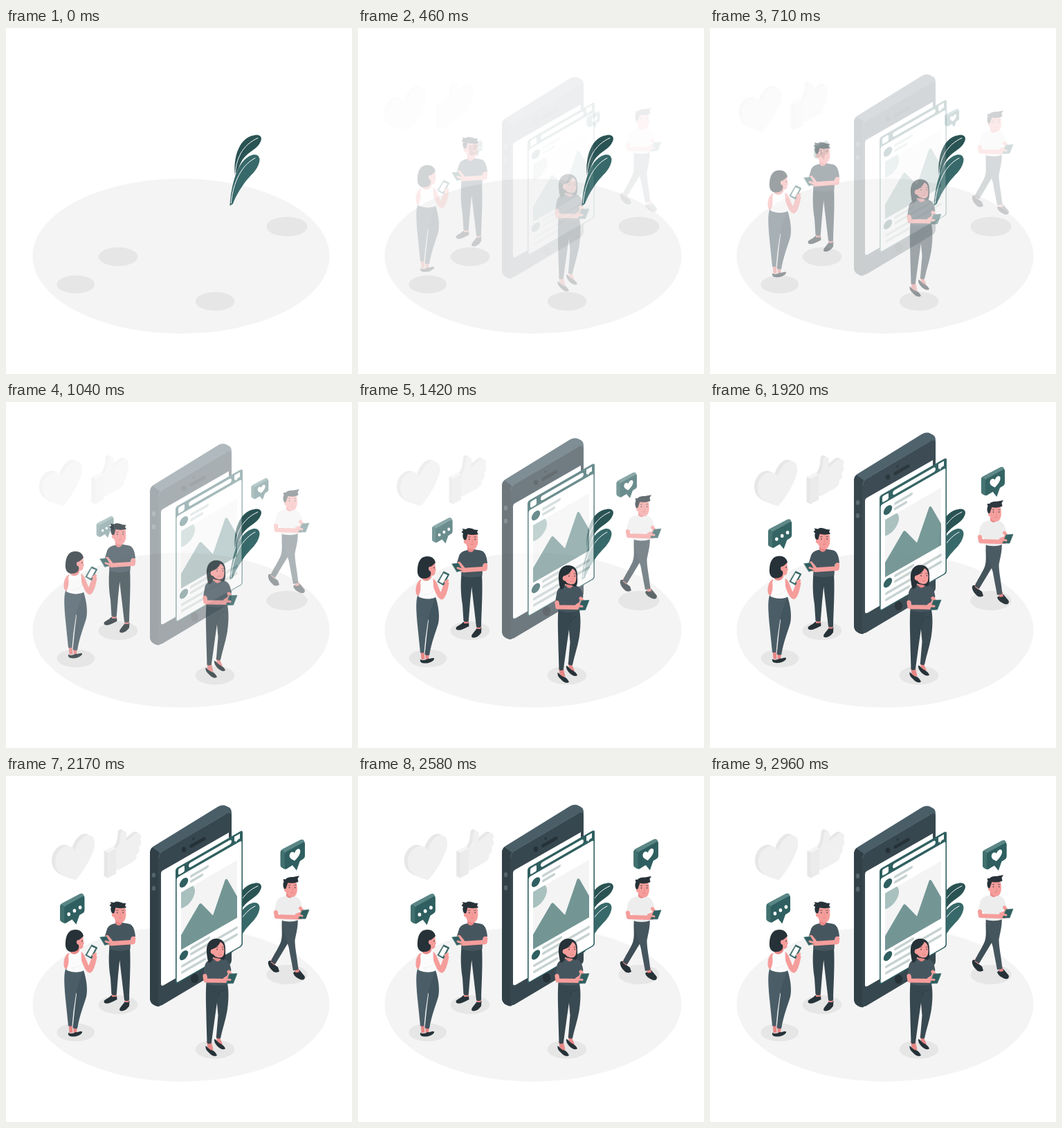
These frames come from a looping animation (500 px wide and 500 px high, 3000 ms). An HTML page with a canvas:

```html
<!DOCTYPE html>
<html lang="en">
<head>
<meta charset="utf-8">
<title>Social feed</title>
<style>
html, body { margin: 0; width: 100%; height: 100%; overflow: hidden; background: #fff; }
canvas { display: block; width: 500px; height: 500px; }
</style>
</head>
<body>
<canvas id="stage"></canvas>
<script>
const SIZE = 500, LOOP = 3000, ISO = -0.575;
const SLOW = 2958, QUICK = SLOW * 2 / 3;
const ratio = window.devicePixelRatio || 1;
const stage = document.getElementById('stage');
const sheet = document.createElement('canvas');
for (const c of [stage, sheet]) c.width = c.height = Math.round(SIZE * ratio);
const out = stage.getContext('2d');
const pen = sheet.getContext('2d');

const teal = '#2f5f60', tealMid = '#41706f', tealSoft = '#c6d2d1';
const ink = '#263238', slate = '#37474f', steel = '#455a64';
const skin = '#f59d9b', skinDark = '#e88887', white = '#fff';

// drawing helpers, all on the current sheet
function fill(d, color) {
  pen.fillStyle = color;
  pen.fill(new Path2D(d));
}
function line(d, color, width) {
  pen.strokeStyle = color;
  pen.lineWidth = width;
  pen.lineCap = pen.lineJoin = 'round';
  pen.stroke(new Path2D(d));
}
function oval(x, y, rx, ry, color) {
  pen.fillStyle = color;
  pen.beginPath();
  pen.ellipse(x, y, rx, ry, 0, 0, Math.PI * 2);
  pen.fill();
}
function box(x, y, w, h, r, color) {
  pen.fillStyle = color;
  pen.beginPath();
  pen.roundRect(x, y, w, h, r);
  pen.fill();
}
function at(x, y, slope, draw) {
  pen.save();
  pen.transform(1, slope, 0, 1, x, y);
  draw();
  pen.restore();
}

// timing curve: cubic-bezier(.36, -.01, .5, 1.38)
function bez(u, a, b) {
  const v = 1 - u;
  return 3 * v * v * u * a + 3 * v * u * u * b + u * u * u;
}
function ease(x) {
  if (x >= 1) return 1;
  let lo = 0, hi = 1;
  for (let i = 0; i < 30; i++) {
    const mid = (lo + hi) / 2;
    if (bez(mid, 0.36, 0.5) < x) lo = mid; else hi = mid;
  }
  return bez(lo, -0.01, 1.38);
}

function layer(draw, alpha = 1, dx = 0, dy = 0, scale = 1, ox = 0, oy = 0) {
  if (alpha <= 0) return;
  pen.setTransform(1, 0, 0, 1, 0, 0);
  pen.clearRect(0, 0, sheet.width, sheet.height);
  pen.scale(ratio, ratio);
  pen.translate(dx + ox, dy + oy);
  pen.scale(scale, scale);
  pen.translate(-ox, -oy);
  draw();
  out.globalAlpha = Math.min(1, alpha);
  out.drawImage(sheet, 0, 0);
}

function ground() {
  oval(253, 329.7, 214.5, 112, '#f4f4f4');
  const shade = '#e6e6e6';
  oval(162, 330.5, 28.3, 13.5, shade);
  oval(100.8, 370.5, 27.3, 13, shade);
  oval(302, 395, 28.3, 13.5, shade);
  oval(406, 287, 29.7, 14, shade);
  fill('M331 213C328 187 337 158 359 155C367 153 371 158 368 164C364 175 350 178 342 190C337 198 335 206 331 213Z', '#2a5354');
  line('M331.5 211C332 190 341 169 364 159', white, 1);
  fill('M323.5 257C325 231 333 190 356 183.5C364 181.5 368 187 366 194C363 206 353 213 346 222C338 233 331 245 328 254Z', '#38696a');
  line('M325.3 253C327 232 336 200 360 188', white, 1);
}

function icons() {
  const side = '#e7e7e7', front = '#f0f0f0';
  const heart = 'M99.5 150.5C90 147 71 144 70 126C69 110 82 99 91 102C96 103 98 106 99 107C101 98 109 86 117 85.5C127 85 129 96 126 105C121 122 107 143 99.5 150.5Z';
  at(-5, -2, 0, () => fill(heart, side));
  fill(heart, front);

  const hand = 'M157 106C163 100 164 92 164.5 84C165 77 172 78 173 84C173.5 89 172 92 171.5 95L185 84C194 79 196 88 192.5 92C196 95 194 101 191 103C193 107 191 112 187 114C189 118 186 122 181 125L161 136L157 135Z';
  at(-4, -2, 0, () => fill(hand, side));
  fill(hand, front);
  fill('M140.5 108L153 102L158 104.5V141L146 147.5L140.5 144.5Z', '#f5f5f5');
  fill('M140.5 108L146 111V147.5L140.5 144.5Z', side);
  fill('M146 111L158 104.5V141L146 147.5Z', '#ebebeb');
}

function card() {
  box(0, 0, 97, 167.5, 3.5, teal);
  box(1.6, 14.5, 93.8, 151.4, 2.5, white);
  box(4, 3, 9, 9, 2, white);
  box(19, 4, 62, 6.6, 3.3, white);
  fill('M85 3H93V10H90L87 12.5V10H85Z', white);

  oval(12, 27.3, 6.2, 6.2, teal);
  line('M23 24H46M23 31.5H38', tealSoft, 4);

  box(8, 39.2, 81, 83, 0, '#f4f4f4');
  pen.save();
  pen.beginPath();
  pen.rect(8, 39.2, 81, 83);
  pen.clip();
  oval(13, 48.2, 15, 15, '#a8c0be');
  pen.restore();

  oval(12, 132.3, 6.2, 6.2, teal);
  line('M23 128.3H48M23 136.5H88M10 146.5H88M10 155.5H42', tealSoft, 4);
}

function phone() {
  fill('M208 113Q208 106 213 103L306 45.6Q313 41.5 319 44.8L323 47Q326 49 326 55V120L220 334L213.5 332Q208 329 208 322Z', '#4a5e68');
  fill('M208 113Q208 108 211.5 104.5L222 112V334Q218 335 213.5 332Q208 329 208 322Z', '#314047');
  fill('M220 121Q220 113.5 226 110L317 56.5Q326 51.5 326 59.5V267Q326 272.5 321 275.5L227 331.5Q220 336 220 328Z', slate);
  line('M220.5 119Q221 113 226 110L317 56.5', '#62737c', 0.6);
  for (const y of [144.4, 163.4]) oval(213.5, y, 2.8, 3.6, '#54636b');
  fill('M224 142Q224 139 226.5 137.6L322 83V249L228 303.5Q224 305.5 224 302Z', white);
  oval(257, 107.5, 3.3, 3.9, ink);
  oval(271, 92, 1.5, 1.8, ink);
  line('M267.5 102.7L286.5 91.7', ink, 4.6);
  oval(272.5, 293.5, 5.6, 6.8, ink);
  at(245, 134.8, ISO, card);
  fill('M253 231.2L279 186.7Q281 183.7 283.5 186.7L299 202.7L316.5 151.7Q318 148.2 320.5 151.7L334 175.2V206L253 252.4Z', '#739695');
}

function bubble(x, y, mark) {
  at(x, y, 0, () => {
    fill('M0 19Q0 15.5 3 14L28 .8Q31 -.5 33 1.5L34.5 5V24L8 42.6Q5 42.5 1.5 40Q0 39 0 37Z', '#5b8686');
    fill('M0 19Q0 17 1 15.6L7 18.5V42.6Q4 42 1.5 40Q0 39 0 37Z', tealMid);
    fill('M6 22Q6 19 8.5 17.5L32 4.5Q34.5 3.5 34.5 6.5V24.5Q34.5 27 32 28.2L27.5 31L22.8 44.2L17 37L9 41.5Q6 43 6 40Z', teal);
    mark();
  });
}
function bubbles() {
  bubble(81.5, 169.2, () => {
    for (let i = 0; i < 3; i++) oval(12.4 + i * 8, 29.6 - i * 4.8, 2.3, 2.7, white);
  });
  bubble(394, 92.5, () =>
    fill('M20 30.5C17 29 12.5 27.5 12.7 23C13 18 18 16.5 20 19.5C21.5 14 27 11.5 28 16C28.8 21 23.5 27 20 30.5Z', white));
}

function face(x, y) {
  for (const dx of [-4.3, 4]) {
    oval(x + dx, y, 0.65, 1, ink);
    line(`M${x + dx - 1.5} ${y - 3.2}l2.8 -.3`, ink, 0.6);
  }
  line(`M${x} ${y}l1.2 4.2l-1.4 .2`, skinDark, 0.7);
  line(`M${x - 1.8} ${y + 7.5}q1.6 .8 3.2 -.2`, '#c9686a', 0.6);
}
function device(d) {
  fill(d, teal);
  line(d, tealMid, 0.7);
}

function manLeft() {
  fill('M142 324.5C145 321.5 149 321 152 317L160 317L160.5 323C154 326 149 329.5 144 328.5C141.5 328 141 326 142 324.5Z', ink);
  fill('M164 337C166 332.5 170.5 329 172 325L178.5 325L178 332.5C174 338 169 341 164.5 339Z', ink);
  fill('M153 313H159.5V319H153ZM171.5 319H177.5V327H171.5Z', skinDark);
  fill('M149.5 247C148 262 148.5 278 151 292L152.5 315.5Q156 318 159.8 316L162 288L164.2 266L167 290L171 324Q175 326 178 324C178.5 300 180.5 272 179 247Z', slate);
  fill('M158 205H168.5V216C165 220 160 219 158 215Z', skinDark);
  fill('M158 213C153 214 147 216 145.5 223L142.5 233L149 236L149.5 250C159 254 172 253 179.5 250L180.5 234L187 232C186 222 184 215 177 213.5L168 212C166 217 161 217.5 158 213Z', '#46565f');
  line('M146 233L151 239', skin, 6);
  line('M184 235L183.5 240L153 242', skin, 6.5);
  fill('M150 238C147 233 143 234 143 238L147 244L154 245.5Z', skin);
  device('M136 233L145 232L151 242L143 244.5Z');
  line('M144 239L150 241', skin, 3);
  fill('M155 189C161 185 172 186 172.8 192C174 201 173.5 209 168 211.5C162 213 157 209 156 204C152 204 152 197 155 197.5Z', skin);
  fill('M153 198C151 195 151 191 152 189L149.5 187L152 184.5L150.5 182L156 183C160 180 165 182 168 183.5L173.5 184L172 187L174 190C169 191.5 162 191.5 158.5 190C157.5 193 157 197 156 198.5Z', ink);
  face(165.2, 197.5);
}

function manRight() {
  fill('M379 267C382 264 384 266 386 270L393 275L395 281C390 284 386 282 384 279C381 276 378 271 379 267Z', ink);
  fill('M415 283C419 281 420 278 424 279L431.5 288C433 292 430 294 426 293C421 291 416 288 415 283Z', ink);
  fill('M384 262L390 266L388 272L382.5 268ZM416 276L422.5 275L424 282L418.5 283Z', skinDark);
  fill('M399 205C397.5 218 400.5 229 397 239C393 249 386 258 382.8 267L388.8 271L407 241L415 213Z', '#3f4f57');
  fill('M399 205C400 222 405 234 408.5 246L415 280L422.5 278.5C421 262 417.5 248 417.5 236C420 224 422.5 214 421.5 205Z', '#46565f');
  fill('M405 166H415V176C412 179 407 178 405 175Z', skinDark);
  fill('M405 172C397 173 391 176 390 184L387.5 194L396 197L397 207C405 210 415 210 422 207L423 193L428 189C427 180 424 174 415 171.5C412 176 408 176 405 172Z', '#ededed');
  line('M390 196L391 202L422 203', skin, 6.2);
  line('M425.5 190L429 195', skin, 5);
  fill('M418 198L428 194L431 199L427 206L418 206Z', skin);
  device('M428 193L438 192L433 205L423 205Z');
  line('M423 200L428 201', skin, 3);
  fill('M404 152C409 147 419 148 420 154C421.5 161 421.5 170 416.5 173C410 175 406 171 405 166.5C401.5 167 401 160.5 404 160Z', skin);
  fill('M402 162C400 158 400 154 401.5 151.5L400.5 148L404 148C408 143.5 413 145.5 416 144.5L424 143L421.5 147L422.5 151.5C417 154 411 154 407.5 153C406 156 405.5 159 404.5 161.5Z', ink);
  face(413.8, 160);
}

function womanLeft() {
  fill('M90.5 359H95.5L96.5 371H91.5ZM97 361H103L102 372L97.5 370Z', skinDark);
  fill('M90 371C93 373 97 372 101 370C104 371 107 368 110 369.5C111 372 105 376 99 376.5C94 377 89 376 90 371Z', ink);
  fill('M92 255C86 257 83 265 83.5 273C84 279 88 281 92 281V266Z', skin);
  fill('M112 281C116 292 118.5 308 116 319C112.5 331 106 347 103.2 364.5Q100 366 96.5 364L99.5 335L102 315L92 290Z', '#43555f');
  fill('M86 279C83 288 84.5 305 86 322L90 361Q92.5 362.5 95.5 361L97.5 340L101 316C102 304 108 294 111 283Z', '#4b5e68');
  fill('M95 247L106 246L106 254C106 259 95 260 93 255Z', skinDark);
  fill('M92 254.5C96 259 103 258.5 106 252.5C111 254 112.5 258 112.5 263L112 281C104 285 93 284 87 280C91 274 91 265 90 260Z', '#fbfbfb');
  line('M95 277C101 279 107 275 110 270', '#ebebeb', 0.8);
  fill('M108.5 254C114 257 116 267 119.5 274L124 262L129 257.5L131.5 260.5C130 270 127 283 121.5 284.5C116 285 111 273 109 266Z', skin);
  device('M124 244L132 248L123.5 264L115 259Z');
  fill('M123.7 246.5L129.5 249L122.5 261.5L117 258.5Z', white);
  line('M126 259L129.5 257', skin, 3.5);
  fill('M101 232L110.5 230C112.5 235 111 238 113 242L111.5 244C112 248 110 250.5 105 250L99 248Z', skin);
  fill('M100 222C90 222 86.5 231 86 240C85 250 89 255 97 254C103 253.5 106.5 250 105 244C101 243 101 236 105 237C107 236 110 233 112 231.5C111 225 106 222 100 222Z', ink);
  oval(104.2, 240, 1.8, 2.6, skin);
  oval(110, 238.5, 0.7, 1, ink);
}

function womanFront() {
  fill('M290.5 382H296.5L299.5 396L294 396L291 391ZM303.5 376L308.5 377L313 388L306 388Z', skinDark);
  fill('M288.5 390C291 391 293 395 297 396C301 397 303 400 305 403.5C302 406.5 297 404 293.5 400C290 397 288 394 288.5 390Z', ink);
  fill('M301 380C304 381 306 385 309.5 386.5C313 388 316 391 317 394C314 396.5 309 394 306 391C303 388 300.5 384 301 380Z', ink);
  fill('M298 300H320C322.5 312 321.5 328 319.5 340C317 354 312.5 366 310 379Q307 380.5 303.8 378L306.5 346L304 318Z', '#3a4a52');
  fill('M289.5 298C288 318 289.5 338 289.5 352L290.5 386Q293.5 388 296.8 386L302 348L306 320L313 299Z', slate);
  line('M307 318C308 312 312 310 316 309', '#2c3b43', 0.9);
  fill('M300 258H311V268C308 273 302 272 299 267Z', skinDark);
  fill('M300 264C293 265 288 268 287 276L285 288L290.5 290L290 300C298 304 312 304 320 300L320 287L325.5 281C324 271 322 265 311 263.5C309 269 304 269.5 300 264Z', '#46565f');
  line('M287.5 289L288.5 295.5L318 296', skin, 6.2);
  line('M322 283L325.5 288', skin, 5);
  fill('M314 292L323 286L328 290L324 299L314 299Z', skin);
  device('M323 286L334 285.5L328.5 299.5L318.5 300Z');
  line('M318.5 294L324 294.5', skin, 3.2);
  fill('M290 255C289 243 294 235 304 235C312 235 317 240 317 249C317 257 318 262 314.5 266L309 264L299 262C299 266 297 269 293 270C291 266 290.5 260 290 255Z', ink);
  fill('M299 250C304 248 308 244 309.5 240C314 241 315.5 246 315.5 252C315.5 258 314 262.5 309 262.5C304 262.5 301 260 299.5 257.5C295 258 294 250 299 250Z', skin);
  face(309.3, 250.5);
}

function render(time) {
  const slow = ease(time / SLOW), quick = ease(time / QUICK);
  const rest = 30 * (1 - slow), drop = -30 * (1 - quick);
  out.globalAlpha = 1;
  out.fillStyle = white;
  out.fillRect(0, 0, stage.width, stage.height);
  layer(ground);
  layer(icons, slow, -rest);
  layer(phone, slow, 0, rest);
  layer(bubbles, slow, 0, 0, 0.5 + slow / 2, 255, 153);
  layer(manRight, slow, 0, -rest);
  layer(manLeft, quick, 0, drop);
  layer(womanLeft, quick, 0, drop);
  layer(womanFront, quick, 0, drop);
}

const start = performance.now();
function tick() {
  render((performance.now() - start) % LOOP);
  requestAnimationFrame(tick);
}
tick();
</script>
</body>
</html>
```
